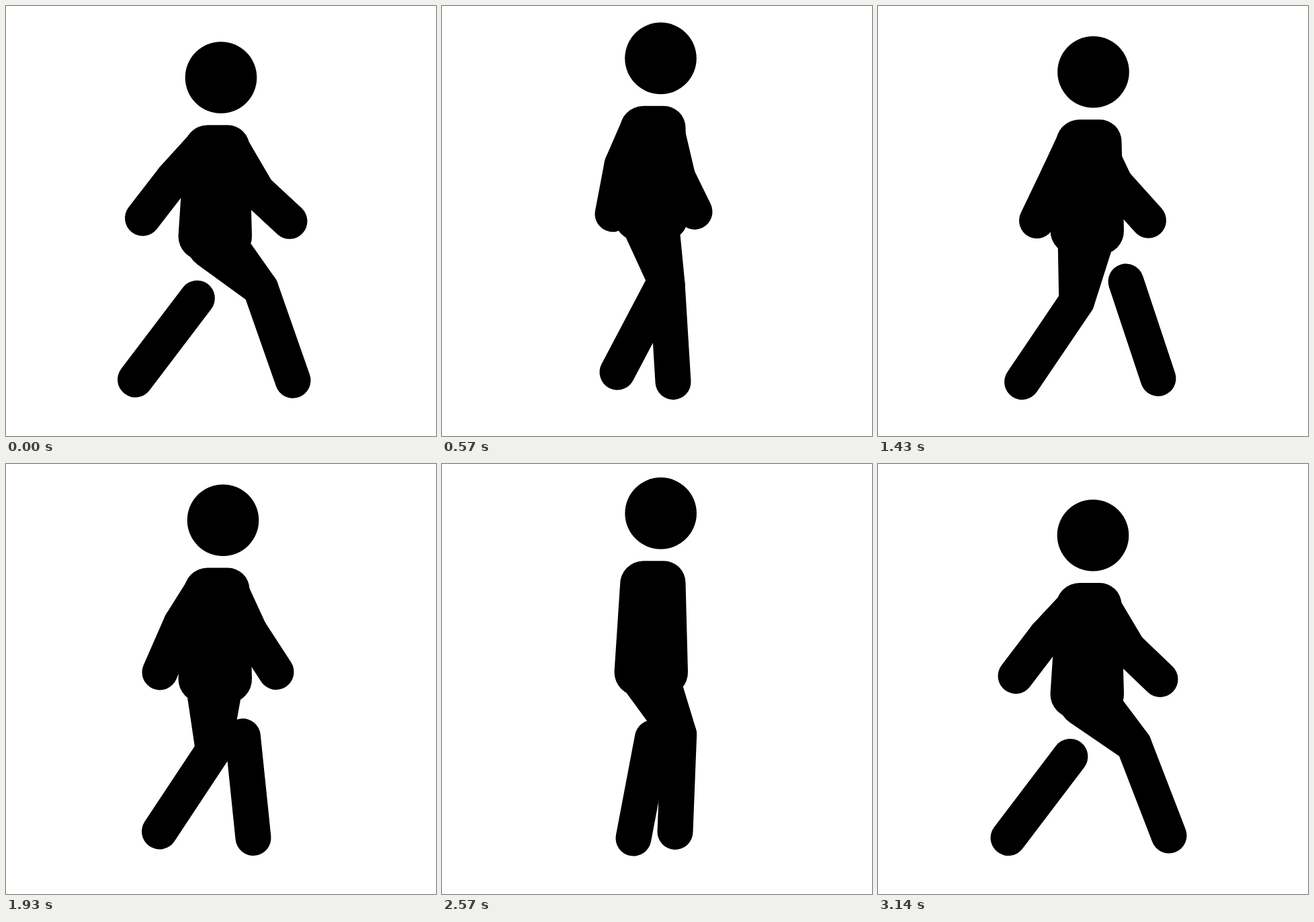
Animation of 640x640 px, one loop 3210 ms. Source, as an HTML page with a canvas:

```html
<!DOCTYPE html>
<html lang="en">
<head>
<meta charset="utf-8">
<title>Walking figure</title>
<style>
html, body { margin: 0; width: 100%; height: 100%; overflow: hidden; background: #fff; }
canvas { display: block; }
</style>
</head>
<body>
<canvas id="stage" width="640" height="640"></canvas>
<script>
const ctx = document.getElementById('stage').getContext('2d');
const LOOP = 3210, STEPS = 45, HALF = STEPS / 2, R = 26.5;

// step, top of torso, head x (repeats on every stride)
const BODY = [
  [0, 177.3, 320], [4.5, 154.5, 323], [8, 148.7, 325.5], [9.5, 144.7, 326.5], [13, 143.3, 326],
  [16, 152.5, 323], [17.5, 156, 322], [20, 169, 320.5], [21.5, 177, 320]
];
// step, foot x, foot y, shin angle in degrees
const LEG = [
  [0, 427, 557.3, 19.3], [4.5, 372, 559, 5.9], [8, 344, 559.5, 3.5], [9.5, 328.5, 559.5, .4],
  [17.5, 248, 559.5, -22.9], [20, 214.5, 559.5, -34.1], [21.5, 198, 559, -37.2],
  [22.5, 196.5, 558.5, -37.2], [27, 228.5, 547, -33.5], [30.5, 265, 547.5, -27.8],
  [32, 291, 543.3, -21.8], [40, 399.5, 553, 15.8], [42.5, 421, 556.8, 18.4], [44, 433, 553, 21.1]
];
// step, shoulder x, elbow x, elbow y, hand x, hand y (y from top of torso)
const ARM = [
  [0, 294, 249.5, 79, 203.5, 138.5], [4.5, 294, 261, 82.5, 229, 155.5],
  [8, 293, 268, 87.5, 254, 161], [9.5, 292, 281.3, 80, 273.5, 154.5],
  [17.5, 316, 332, 101.5, 370.5, 155], [20, 322, 353, 95, 402.5, 150],
  [21.5, 332, 372.5, 98, 420, 143.5], [22.5, 334, 374, 98.5, 422, 143],
  [27, 333, 362.7, 94.5, 402, 155], [30.5, 333, 351, 106.5, 376, 157.5],
  [32, 329, 341, 91.5, 361, 154.5], [40, 295, 282, 83, 263, 155.5],
  [42.5, 293.5, 269, 82.5, 236.5, 150.5], [44, 296, 250.3, 79, 205, 138.5]
];
const TORSO = new Path2D('M300 0H330A32.5 32.5 0 0 1 362.5 32L366 165A35 35 0 0 1 331 201' +
  'H292A35.5 35.5 0 0 1 256.5 165L265 36A35 35 0 0 1 300 0Z');

// Smooth cyclic interpolation through the keys
function sample(keys, step, period) {
  const n = keys.length, s = step % period;
  const key = (i, c) => keys[(i + n) % n][c] + (c ? 0 : Math.floor(i / n) * period);
  let i = n - 1;
  while (keys[i][0] > s) i--;
  const h = key(i + 1, 0) - key(i, 0), u = (s - key(i, 0)) / h;
  const slope = (j, c) => (key(j + 1, c) - key(j - 1, c)) / (key(j + 1, 0) - key(j - 1, 0)) * h;
  return keys[0].slice(1).map((_, v) => {
    const c = v + 1, a = key(i, c), b = key(i + 1, c);
    return a + u * u * (3 - 2 * u) * (b - a)
      + u * (1 - u) * ((1 - u) * slope(i, c) - u * slope(i + 1, c));
  });
}

function disc(x, y, r) {
  ctx.beginPath();
  ctx.arc(x, y, r, 0, 2 * Math.PI);
  ctx.fill();
}

// Limb between two round ends, tapering from r1 to r2
function limb(x1, y1, r1, x2, y2, r2 = R) {
  const dir = Math.atan2(y2 - y1, x2 - x1);
  const side = Math.acos((r1 - r2) / Math.hypot(x2 - x1, y2 - y1));
  ctx.beginPath();
  ctx.arc(x1, y1, r1, dir + side, dir - side + 2 * Math.PI);
  ctx.arc(x2, y2, r2, dir - side, dir + side);
  ctx.fill();
}

function shin(x, y, angle, length) {
  const a = angle * Math.PI / 180;
  const knee = [x - length * Math.sin(a), y - length * Math.cos(a)];
  limb(...knee, R, x, y);
  return knee;
}

function arm(step, top) {
  const [sx, ex, ey, hx, hy] = sample(ARM, step, STEPS);
  limb(sx, top + 30, R, ex, top + ey);
  limb(ex, top + ey, R, hx, top + hy);
}

function draw(step) {
  ctx.fillStyle = '#fff';
  ctx.fillRect(0, 0, 640, 640);
  ctx.fillStyle = '#000';

  const [top, headX] = sample(BODY, step, HALF);
  disc(headX, top - 70.8, 53.3);
  ctx.save();
  ctx.translate(0, top);
  ctx.fill(TORSO);
  ctx.restore();

  arm(step, top);
  arm(step + HALF, top);

  // The far leg shows only its shin
  const [fx, fy, fa] = sample(LEG, step + HALF, STEPS);
  shin(fx - 4, fy - 2.5, fa, 152);
  const knee = shin(...sample(LEG, step, STEPS), 145);
  limb(310, top + 173, 42.5, ...knee);
}

const start = performance.now();
function tick() {
  const t = (performance.now() - start) % LOOP;
  // 14 pictures per second, held on a 10 ms clock
  draw(Math.floor((Math.floor(t / 10) * 10 + 5) * .014) % STEPS);
  requestAnimationFrame(tick);
}
tick();
</script>
</body>
</html>
```
